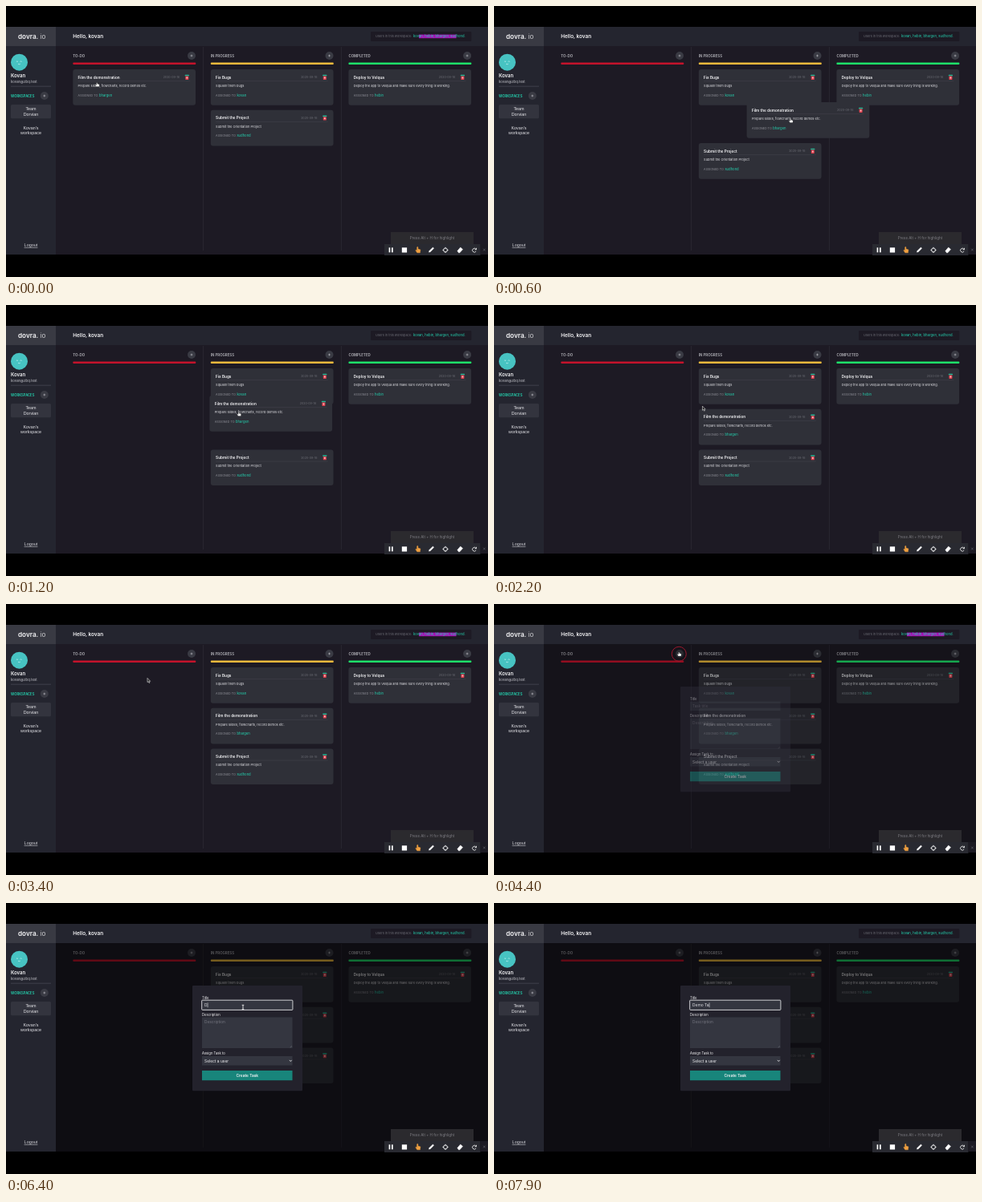
Write an HTML page that moves like this. It is 600 px wide and 338 px high and loops after 8 s.

```html
<!DOCTYPE html>
<html lang="en">
<head>
<meta charset="utf-8">
<title>Task board</title>
<style>
html, body { margin: 0; width: 100%; height: 100%; overflow: hidden; background: #000; }
svg { display: block; width: 100%; height: 100%; }
text { font-family: Inter, "Open Sans", sans-serif; fill: #f4f4f6; white-space: pre; }
.arial { font-family: "Liberation Sans", Arial, sans-serif; }
.b { font-weight: 600; }
.mid { text-anchor: middle; }
.end { text-anchor: end; }
</style>
</head>
<body>
<svg id="stage" viewBox="0 0 600 338"></svg>
<script>
const LOOP = 8000;
const TEAL = '#24d3b0', PANEL = '#24252f', CARD = '#2f3038', BG = '#1d1a24', FIELD = '#343640';
const STEP = 50.7, TOP = 79;

const rect = (x, y, w, h, fill, extra = '') =>
  `<rect x="${x}" y="${y}" width="${w}" height="${h}" fill="${fill}" ${extra}/>`;
const circle = (x, y, r, fill, extra = '') =>
  `<circle cx="${x}" cy="${y}" r="${r}" fill="${fill}" ${extra}/>`;
const path = (d, stroke, width = 1, fill = 'none') =>
  `<path d="${d}" stroke="${stroke}" stroke-width="${width}" fill="${fill}"/>`;
const text = (x, y, size, str, cls = '', fill = '#f4f4f6', extra = '') =>
  `<text x="${x}" y="${y}" font-size="${size}" class="${cls}" style="fill:${fill}" ${extra}>${str}</text>`;
const group = (id, body, extra = '') => `<g id="${id}" ${extra}>${body}</g>`;

const plus = (x, y) => circle(x, y, 5, '#3a3b44') +
  path(`M${x - 1.4} ${y}h2.8M${x} ${y - 1.4}v2.8`, '#c4c4ca', .6);

const column = (x, name, color) =>
  text(x, 63.7, 4.4, name, 'b', '#b4b4ba') + plus(x + 147.7, 62) +
  rect(x, 70.4, 153, 2.6, color, 'rx="1"');

const trash = rect(139.4, 6.8, 5.2, 1.5, '#25b694', 'rx=".4"') +
  rect(140, 8.5, 4, 4.4, '#e0404e', 'rx=".6"') + rect(141.2, 9.6, 1.6, 1.8, '#f6c3c6');

const card = (id, x, y, title, info, who, date = '2020-09-16') => group(id,
  rect(0, 0, 152.7, 44.7, CARD, 'rx="3"') +
  text(6.3, 11.8, 4.7, title, 'b') +
  text(132.8, 11.4, 3.6, date, 'end', '#6b6c74') + trash +
  path('M6.3 14.6H146', '#44454e', .5) +
  text(6.3, 21.9, 4, info, '', '#dcdce0') +
  text(6.3, 33.8, 3.7, 'ASSIGNED TO:', '', '#8d8e96') +
  text(32.6, 33.8, 4.2, who, '', TEAL),
  `transform="translate(${x} ${y})"`);

const sidebar =
  rect(0, 26, 62, 284, PANEL) + rect(0, 26, 62, 24, '#393a43') +
  text(15, 41, 8.2, 'dovra.<tspan font-weight="300"> io</tspan>', 'b') +
  circle(16.5, 70.2, 10.5, '#47c3c2') +
  path('M12.9 69.5q1-1.2 2 0M17.6 69.5q1-1.2 2 0M15 72.2q1.4 1 2.8 0', '#e7ffff', .6) +
  text(6, 88.7, 6, 'Kovan', 'b') +
  text(6, 95.6, 4.3, 'kovan@zbq.test', '', '#c5c5cb') +
  path('M6 100.2H56', '#52535d', .6) +
  text(6, 113.6, 4.2, 'WORKSPACES', 'b', TEAL) + plus(47.8, 112) +
  rect(6, 123, 50, 17.2, '#33343e', 'rx="1.5"') +
  text(31, 130.3, 5.4, 'Team', 'arial mid', '#e4e4e8') +
  text(31, 136.5, 5.4, 'Dorvian', 'arial mid', '#e4e4e8') +
  text(31, 154, 5.4, "Kovan's", 'arial mid', '#e4e4e8') +
  text(31, 160, 5.4, 'workspace', 'arial mid', '#e4e4e8') +
  text(31, 300.2, 5.5, 'Logout', 'arial mid', '#d0d0d5', 'text-decoration="underline"');

const header =
  rect(62, 26, 538, 24, PANEL) +
  text(83.3, 40.4, 6.4, 'Hello, kovan', 'b') +
  rect(454, 32, 125.3, 12, BG, 'rx="1"') +
  text(460, 39.4, 3.9, 'Users in this workspace:', '', '#696a73') +
  rect(514, 35.6, 46.5, 4.6, '#a80fb5', 'id="mark"') +
  text(507, 39.4, 4.2, 'kovan, hebin, bhargen, sudhond.', '', TEAL);

const board =
  rect(62, 50, 538, 260, BG) +
  path('M245.6 51V305M417.4 51V305', '#33313b', .6) +
  column(83.3, 'TO-DO', '#c4132b') +
  column(254.8, 'IN PROGRESS', '#edb93c') +
  column(426.4, 'COMPLETED', '#1ee069') +
  card('fix', 254.8, TOP, 'Fix Bugs', 'Squash them bugs', 'kovan') +
  card('deploy', 426.4, TOP, 'Deploy to Velqua',
    'Deploy the app to Velqua and make sure every thing is working.', 'hebin') +
  card('submit', 254.8, TOP, 'Submit the Project', 'Submit the Orientation Project', 'sudhond') +
  card('film', 83.3, TOP, 'Film the demonstration',
    'Prepare slides, flowcharts, record demos etc.', 'bhargen') +
  circle(230.3, 62.3, 9, 'none', 'id="ring" stroke="#d0203c" stroke-width="1"');

const modal = group('modal',
  rect(62, 50, 538, 260, '#000', 'opacity=".5"') +
  rect(232, 103, 137, 131.3, '#23222c', 'rx="1"') +
  text(244, 119.6, 4.2, 'Title') +
  rect(244, 121.6, 112.5, 11.4, FIELD) +
  rect(243.7, 121.2, 113.2, 12.2, 'none', 'id="focus" stroke="#e2e2e6" stroke-width=".9" rx=".8"') +
  text(247, 129.1, 4.6, 'Task title', '', '#74757f', 'id="hint"') +
  text(247, 129.1, 4.9, '', '', '#e2e2e6', 'id="typed"') +
  rect(247, 124.4, .6, 5.8, '#e8e8ec', 'id="caret"') +
  text(244, 140.9, 4.2, 'Description') +
  rect(244, 142.5, 112.5, 38.5, FIELD) +
  text(247, 150, 4.8, 'Description', '', '#74757f') +
  path('M353.6 180.3l2.2-2.2M355 180.3l.8-.8', '#85868e', .4) +
  text(244, 189, 4.2, 'Assign Task to') +
  rect(244, 191, 112.5, 11.5, FIELD) +
  text(247, 198.5, 4.9, 'Select a user') +
  path('M352.8 195.9l1.5 1.6 1.5-1.6', '#f0f0f2', .8) +
  rect(244, 209, 112.5, 12.2, '#18857b') +
  text(300.3, 216.8, 4.8, 'Create Task', 'b mid'));

const toolbar =
  rect(479, 282, 103, 15, '#2b2a2e') +
  text(530.5, 291.2, 4.6, 'Press Alt + H for highlight', 'mid', '#7d7c82') +
  rect(471, 297, 119.5, 14, '#292a31') + rect(590.5, 297, 9.5, 13, '#1c1a22') +
  rect(476.6, 301.3, 1.7, 6, '#fff') + rect(480, 301.3, 1.7, 6, '#fff') +
  rect(492.8, 301.3, 6.3, 6.2, '#fff') +
  path('M511.8 307.8l-2-3 .8-.6 1 .8v-4.2q.7-.9 1.3 0v2.3l3 .8-.5 3.9z', '#f0a040', .4, '#f0a040') +
  path('M526.4 307.2l.5-1.9 4.5-4.4 1.3 1.3-4.4 4.5z', '#fff', .3, '#fff') +
  circle(547, 304.4, 2.5, 'none', 'stroke="#fff" stroke-width=".8"') +
  path('M547 300.8v2M547 306v2M543.4 304.4h2M548.6 304.4h2', '#fff', .8) +
  path('M561.8 305.4l3.9-4.3 2.9 2.5-3.8 4.2h-1.4z', '#fff', .4, '#fff') +
  path('M585 303.3a2.4 2.4 0 1 0 .1 2.6M585.5 301.8v2h-2', '#fff', .8) +
  path('M594.2 302.6l2.4 2.8M596.6 302.6l-2.4 2.8', '#77767e', .5);

const pointers =
  group('arrow', path('M0 -2.6v5.2l1.2-1 .9 1.9.9-.4-.9-1.8h1.6z', '#fff', .5, '#222')) +
  group('hand', path('M-1.6 2.5l-1.3-2.2q0-.8.9-.4l.6.6v-2.6q.6-.8 1.1 0v1.4q1.4-.5 2.5.6l-.3 2.6z',
    '#222', .3, '#fff')) +
  group('beam', path('M-1.3 -2.7h2.6M0 -2.7v5.4M-1.3 2.7h2.6', '#fff', .8));

document.getElementById('stage').innerHTML =
  rect(0, 0, 600, 338, '#000') + board + modal + header + sidebar + toolbar + group('cursor', pointers);

const $ = Object.fromEntries([...document.querySelectorAll('[id]')].map(n => [n.id, n]));
const show = (node, on) => node.setAttribute('display', on ? 'inline' : 'none');
const place = (node, [x, y]) => node.setAttribute('transform', `translate(${x} ${y})`);
const clamp = v => Math.min(1, Math.max(0, v));
const within = (t, a, b) => t >= a && t < b;

// Points are [time, x, y], eased in and out between stops.
function along(points, t) {
  let i = 0;
  while (i < points.length - 2 && t >= points[i + 1][0]) i++;
  const [a, b] = [points[i], points[i + 1]];
  const p = clamp((t - a[0]) / (b[0] - a[0]));
  const k = p * p * (3 - 2 * p);
  return [a[1] + (b[1] - a[1]) * k, a[2] + (b[2] - a[2]) * k];
}

const cursorPath = [
  [0, 114, 98], [150, 138, 102], [600, 370, 143], [900, 388, 134], [1200, 290.5, 136],
  [1800, 292, 140], [2800, 200, 108], [3400, 176, 95], [3550, 176, 95], [4000, 231, 62.5],
  [4400, 231, 62.5], [4900, 277, 156], [5300, 295, 130]
];
const filmPath = [
  [150, 83.3, TOP], [600, 314.6, 120], [900, 334, 111], [1200, 253.4, 113],
  [1350, 253.4, 117], [1650, 254.8, TOP + STEP]
];
const keyTimes = [6300, 6800, 7000, 7200, 7400, 7600, 7850];

function draw(t) {
  place($.film, along(filmPath, t));
  const open = 1 - Math.pow(1 - clamp((t - 500) / 200), 2.4);
  place($.submit, [254.8, TOP + STEP * (1 + open)]);

  show($.mark, t < 300 || within(t, 2300, 5500));
  show($.ring, within(t, 4200, 6000));

  show($.modal, t >= 4300);
  $.modal.setAttribute('opacity', clamp((t - 4300) / 200));
  const focused = t >= 5400;
  const typed = 'Demo Ta'.slice(0, keyTimes.filter(k => t >= k).length);
  show($.focus, focused);
  show($.hint, !typed);
  $.typed.textContent = typed;
  show($.caret, focused);
  $.caret.setAttribute('x', 247.2 + (typed ? $.typed.getComputedTextLength() : 0));

  place($.cursor, along(cursorPath, t));
  show($.cursor, t < 6800);
  const beam = t >= 4750;
  const hand = t < 1700 || within(t, 3900, 4750);
  show($.beam, beam);
  show($.hand, hand);
  show($.arrow, !beam && !hand);
}

const start = performance.now();
function tick() {
  draw((performance.now() - start) % LOOP);
  requestAnimationFrame(tick);
}
tick();
</script>
</body>
</html>
```
